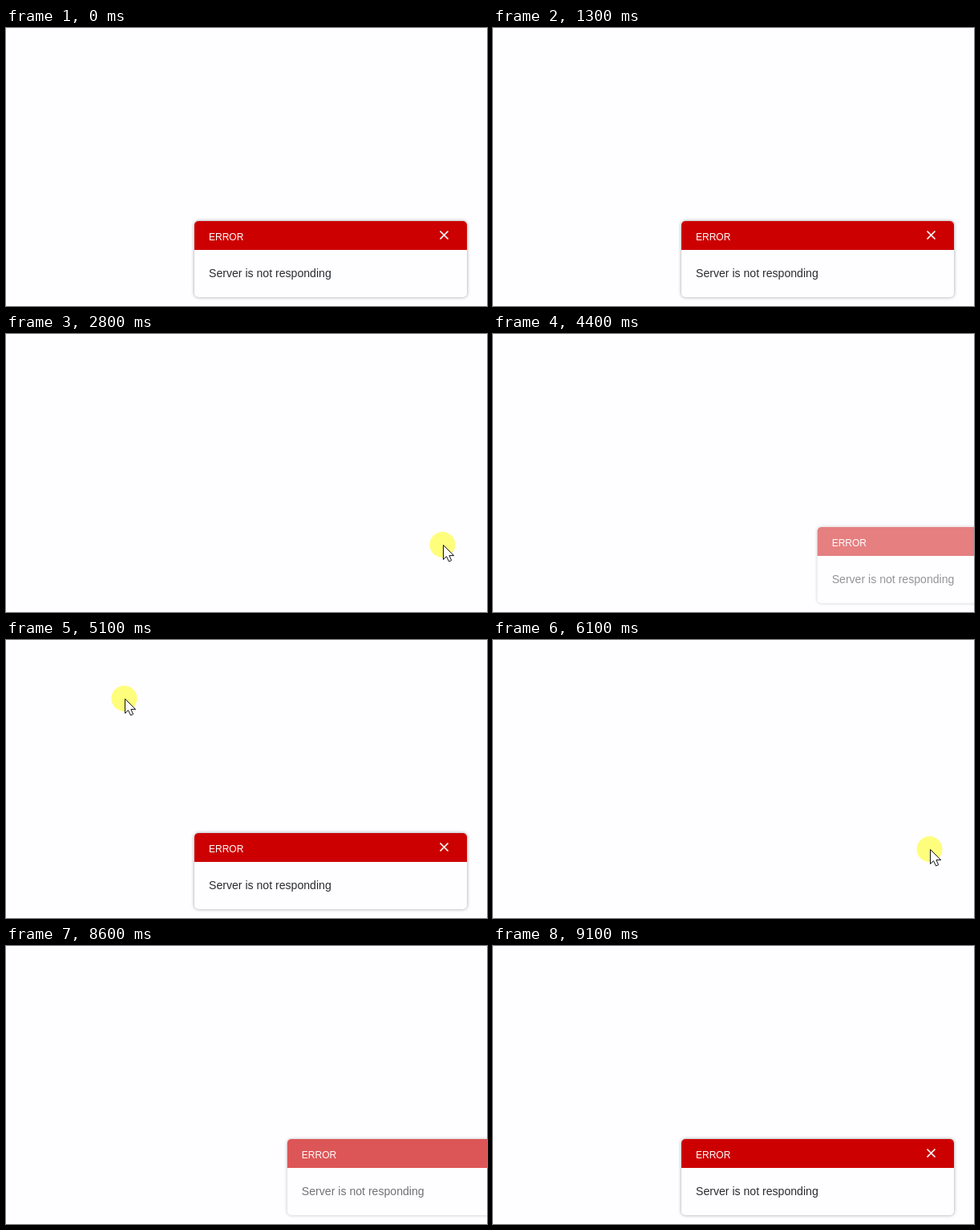
These frames come from a looping animation (600 px wide and 347 px high, 9900 ms). An HTML page:

```html
<!DOCTYPE html>
<html lang="en">
<head>
<meta charset="utf-8">
<title>Error toast</title>
<style>
  html, body { margin: 0; width: 100%; height: 100%; overflow: hidden; background: #fefdff; }
  #stage { position: relative; width: 600px; height: 347px; overflow: hidden; }
  #toast {
    position: absolute; left: 235px; top: 241px; width: 340px; height: 95px;
    border-radius: 5px; background: #fefdff;
    box-shadow: 0 0 4px rgba(0, 0, 0, .38);
    font-family: Arial, "Liberation Sans", sans-serif;
  }
  #toast header { height: 36px; border-radius: 5px 5px 0 0; background: #c00; }
  #toast span { position: absolute; left: 18px; line-height: 20px; white-space: nowrap; }
  #title { top: 10px; font-size: 12px; color: #fff; }
  #text { top: 55px; font-size: 14.1px; color: #282b2f; }
  #toast svg { position: absolute; left: 305px; top: 11px; }
  #pointer { position: absolute; left: -20px; top: -20px; }
</style>
</head>
<body>
<div id="stage">
  <div id="toast">
    <header></header>
    <span id="title">ERROR</span>
    <span id="text">Server is not responding</span>
    <svg width="13" height="13"><path d="M1.5 1.5l10 10m0-10l-10 10" stroke="#fff" stroke-width="1.7"/></svg>
  </div>
  <svg id="pointer" width="44" height="44">
    <circle cx="19.5" cy="20" r="16" fill="#fefe7c"/>
    <path d="M20.5 20.5v18l4-3.8 3 6.3 3.2-1.4-2.8-6h5.8z" fill="#fff" stroke="#111" stroke-width="1"/>
  </svg>
</div>
<script>
  const LOOP = 9900, STEP = 100, SLIDE = 300, LAG = 50;
  const toast = document.getElementById('toast');
  const pointer = document.getElementById('pointer');

  // The last visit runs on past the end of the loop.
  const visits = [
    { enter: 905, close: 2800 },
    { enter: 4297, close: 6100 },
    { enter: 8457, close: LOOP + 1000 }
  ];

  // The pointer glides from a start to the cross, rests, then leaves.
  const trips = [
    { start: 1600, rest: 2500, leave: 2900, end: 3300, from: [352, 144], at: [545, 263], to: [-24, -74] },
    { start: 5100, rest: 5800, leave: 6500, end: 6800, from: [148, 73], at: [545, 261], to: [255, 83] }
  ];

  const slide = toast.animate([
    { transform: 'translateX(100%)', opacity: 0 },
    { transform: 'none', opacity: 1 }
  ], { duration: SLIDE, easing: 'ease-out', fill: 'both' });
  slide.pause();

  const part = (t, a, b) => Math.min(1, Math.max(0, (t - a) / (b - a)));
  const glide = p => 1 - (1 - p) ** 5;
  const mix = (a, b, p) => a.map((v, i) => Math.round(v + (b[i] - v) * p));
  const show = (el, on) => { el.style.visibility = on ? 'visible' : 'hidden'; };

  function visitAge(t) {
    const visit = visits.find(v => t >= v.enter + LAG && t < v.close);
    return visit && t - visit.enter;
  }

  function drawToast(t) {
    const age = visitAge(t) ?? visitAge(t + LOOP);
    show(toast, age !== undefined);
    slide.currentTime = Math.min(SLIDE, age ?? 0);
  }

  function drawPointer(t) {
    const trip = trips.find(p => t >= p.start && t < p.end);
    show(pointer, trip);
    if (!trip) return;
    const { start, rest, leave, end, from, at, to } = trip;
    const [x, y] = t < leave
      ? mix(from, at, glide(part(t, start, rest)))
      : mix(at, to, part(t, leave, end));
    pointer.style.transform = `translate(${x}px, ${y}px)`;
  }

  const begin = performance.now();
  function tick() {
    const now = (performance.now() - begin) % LOOP;
    const t = Math.floor(now / STEP) * STEP;
    drawToast(t);
    drawPointer(t);
    requestAnimationFrame(tick);
  }
  tick();
</script>
</body>
</html>
```
